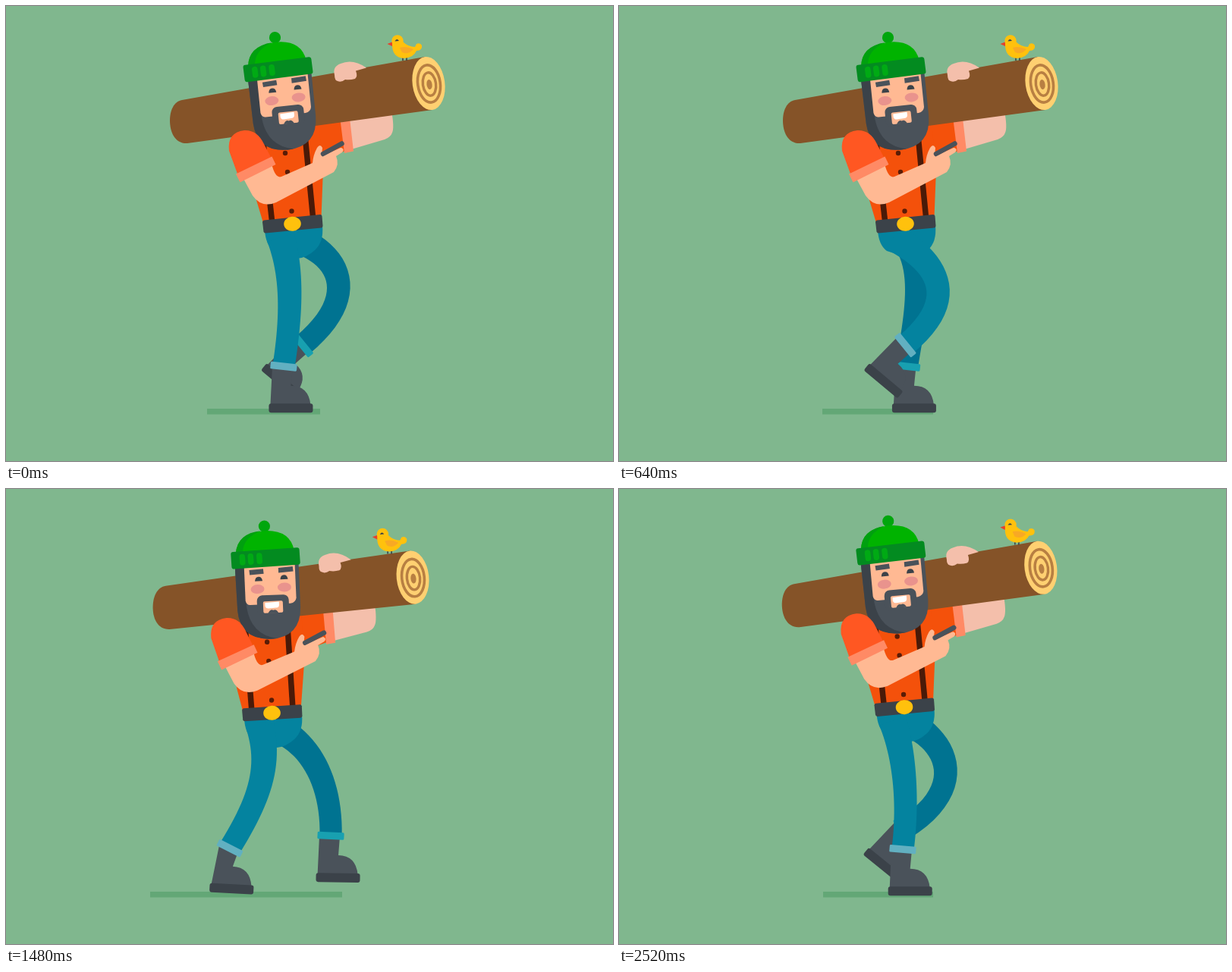
Write an HTML page with a canvas that moves like this. It is 800 px wide and 600 px high and loops after 2.56 s.

```html
<!DOCTYPE html>
<html lang="en">
<head>
<meta charset="utf-8">
<title>Lumberjack walk</title>
<style>
html, body { margin: 0; width: 100%; height: 100%; overflow: hidden; background: #80b78e; }
canvas { display: block; }
</style>
</head>
<body>
<canvas id="stage" width="800" height="600"></canvas>
<script>
const ctx = document.getElementById('stage').getContext('2d');
const LOOP = 2560, CYCLE = 1280, STEP = 640, TICK = 40;
const RAD = Math.PI / 180;
const SKIN = '#ffb993', PALE = '#f4bfab', DARK = '#4a525a', DEEP = '#3b4249';
// bow shifts the upper curve handle of a leg
const NEAR = { trouser: '#04839f', cuff: '#62b0c1', bow: [0, 0] };
const FAR = { trouser: '#007391', cuff: '#18a0b0', bow: [14, -9] };

// time, two curve handles, ankle (all relative to the hip), cuff angle, foot angle
const LEG = [
  [0, 16, 50, 14, 105, 4, 170, 6, 0],
  [200, 13, 52, 1, 94, -40, 160.5, 27, 3],
  [330, 20, 50, 11, 97, -52, 150, 40, 20],
  [440, 31, 47, 33, 99, -29, 150, 46, 45],
  [600, 40, 29, 93, 85, 2, 142.5, 50, 39],
  [640, 51, 29, 94, 77, 15.5, 142, 51, 40],
  [840, 37, 26, 81, 72, 79.5, 144, 3, 1],
  [960, 42, 39, 75, 84, 85, 156.5, 0, 0],
  [1080, 36, 54, 59, 95, 55, 160, 3, 0],
  [1240, 15.5, 44.5, 21.5, 106.5, 13.5, 169.5, 5, 0]
];
// time, left end, right end
const SHADOW = [
  [0, 265, 414], [200, 190, 443], [350, 135, 441], [440, 149, 436],
  [640, 268, 414], [840, 204, 435], [990, 178, 440], [1240, 269, 414]
];

// Smooth periodic curve through the keys
function spline(keys, time) {
  const t = ((time % CYCLE) + CYCLE) % CYCLE, n = keys.length;
  let i = n - 1;
  while (keys[i][0] > t) i--;
  const key = k => keys[(k + n) % n];
  const at = k => key(k)[0] + CYCLE * Math.floor(k / n);
  const span = at(i + 1) - at(i), u = (t - at(i)) / span;
  return key(i).slice(1).map((a, c) => {
    const b = key(i + 1)[c + 1];
    const m0 = (b - key(i - 1)[c + 1]) / (at(i + 1) - at(i - 1)) * span;
    const m1 = (key(i + 2)[c + 1] - a) / (at(i + 2) - at(i)) * span;
    return a + u * (m0 + u * (3 * (b - a) - 2 * m0 - m1 + u * (2 * (a - b) + m0 + m1)));
  });
}

function shape(d, color) {
  ctx.fillStyle = color;
  ctx.fill(new Path2D(d));
}

function line(d, color, width, cap = 'butt') {
  ctx.strokeStyle = color;
  ctx.lineWidth = width;
  ctx.lineCap = cap;
  ctx.stroke(new Path2D(d));
}

function oval(x, y, rx, ry, color, tilt = 0, ring = 0) {
  ctx.beginPath();
  ctx.ellipse(x, y, rx, ry, tilt * RAD, 0, 7);
  ctx.fillStyle = ctx.strokeStyle = color;
  ctx.lineWidth = ring;
  ring ? ctx.stroke() : ctx.fill();
}

function box(x, y, w, h, r, color) {
  ctx.beginPath();
  ctx.roundRect(x, y, w, h, r);
  ctx.fillStyle = color;
  ctx.fill();
}

function turned(x, y, deg, draw) {
  ctx.save();
  ctx.translate(x, y);
  ctx.rotate(deg * RAD);
  draw();
  ctx.restore();
}

function pivot(x, y, deg, draw) {
  turned(x, y, deg, () => { ctx.translate(-x, -y); draw(); });
}

function place(o, deg, x, y) {
  const c = Math.cos(deg * RAD), s = Math.sin(deg * RAD);
  return [o[0] + x * c - y * s, o[1] + x * s + y * c];
}

function leg(hx, hy, time, { trouser, cuff, bow }) {
  const [kx, ky, x2, y2, ax, ay, cuffTilt, footTilt] = spline(LEG, time);
  const x1 = kx + bow[0], y1 = ky + bow[1];
  const ankle = [hx + ax, hy + ay];
  const joint = place(ankle, cuffTilt, -2, 15);
  const foot = (x, y) => place(joint, footTilt, x + 2, y - 15);

  const boot = [place(ankle, cuffTilt, -15, 0), foot(-16, 51), foot(37, 51),
    foot(34, 26), foot(11, 26), place(ankle, cuffTilt, 12, 0)];
  shape(`M${boot[0]}L${boot[1]}L${boot[2]}Q${boot[3]} ${boot[4]}L${boot[5]}Z`, DARK);
  turned(...joint, footTilt, () => box(-16, 34.5, 58, 12, 3, DEEP));

  const left = [], right = [];
  for (let i = 0; i <= 24; i++) {
    const s = i / 24, r = 1 - s;
    const x = 3 * r * r * s * x1 + 3 * r * s * s * x2 + s * s * s * ax;
    const y = 3 * r * r * s * y1 + 3 * r * s * s * y2 + s * s * s * ay;
    const dx = r * r * x1 + 2 * r * s * (x2 - x1) + s * s * (ax - x2);
    const dy = r * r * y1 + 2 * r * s * (y2 - y1) + s * s * (ay - y2);
    const k = (14.6 + 4 * r * r) / Math.hypot(dx, dy);
    left.push([hx + x - dy * k, hy + y + dx * k]);
    right.unshift([hx + x + dy * k, hy + y - dx * k]);
  }
  shape('M' + [...left, ...right].join('L') + 'Z', trouser);
  turned(...ankle, cuffTilt, () => box(-17.5, -4.5, 35, 9.5, 1.5, cuff));
}

function bird() {
  line('M523 66V72M528 66V72', DEEP, 1.6);
  shape('M510 47L502.5 50L510 53.5Z', '#e5412d');
  shape('M509 49Q508 68 525 69Q537 68 541 59Q549 59 548 52Q546 48 541 50L539 54Q530 54 523 47Z', '#ffc10d');
  oval(516, 46, 7.7, 7.7, '#ffc10d');
  shape('M519 55Q527 52 537 57Q530 65 522 61Z', '#f8a924');
  shape('M512.5 46.5Q515 42 518 46Z', DEEP);
}

function log() {
  shape('M232 124L552 67L562 137L239 181C223 182 216 167 216 151C216 138 221 126 232 124Z', '#855328');
  oval(557, 102, 21.3, 35.3, '#ffd071', -8);
  oval(557.5, 102.5, 14.8, 24.8, '#b87f42', -8, 3.6);
  oval(558, 103, 8.6, 15.3, '#b87f42', -8, 3.4);
  oval(558, 103.5, 3.6, 6.5, '#b87f42', -8);
}

function head(open) {
  shape('M304 100H388V158Q387 198 347 199Q307 197 305 160Z', DARK);
  shape('M304 100H317V155Q321 192 355 198.5Q307 202 305 160Z', DEEP);
  shape('M316 99H383V146Q382 152 375 153H322Q317 153 316 147Z', SKIN);
  oval(332.5, 132.5, 9, 6, '#e9938d');
  oval(368, 131.5, 9, 6, '#e9938d');
  shape('M322.5 107L341 106L341.5 112.5L323 113.5ZM361 105.5L380 104.5L380.5 111L361 112Z', DARK);
  for (const [x, y] of [[334.5, 122], [368, 121]]) {
    const top = y - 2 * (1 - open), h = 1.8 + 4 * open;
    shape(`M${x - 5} ${top}Q${x - 4.5} ${top - h} ${x} ${top - h}T${x + 5} ${top}Z`, DEEP);
  }
  box(331, 141, 42, 27, 7, DARK);
  box(339, 149, 26, 15.5, 2, SKIN);
  shape('M345 165Q348 159 352 161Q356 159 359 165Z', DARK);
  shape('M341.5 151L360 150V154Q360 158 356 158L346 158.5Q342 158.5 341.5 155Z', '#fff');

  oval(345, 50, 7.6, 7.6, '#00a60d');
  shape('M306 84Q309 57 345 56Q379 56 383 84Z', '#00b300');
  shape('M306 84Q309 58 340 56Q316 64 315 84Z', '#00a00f');
  pivot(345, 92, -1.4, () => {
    box(299.5, 81, 90.5, 22.5, 3, '#038b20');
    for (const x of [310.5, 321.5, 333]) box(x, 84.5, 7.5, 15, 3.7, '#00aa14');
  });
}

function nearArm() {
  shape('M312 226L350 208Q355 228 363 225L404 207Q405 196 410 187Q414 181 417 187L416 198L441 187Q447 188 443 193L435 198Q440 209 432 219L356 259Q337 267 325 250Z', SKIN);
  line('M418 195L442.5 181.5', DARK, 6.5, 'round');
  line('M420 200.5L441.5 190', SKIN, 5.5, 'round');
  shape('M294 191Q291 167 314 164Q331 163 340 182L351 203L306 224Z', '#ff5722');
  shape('M303 221.5L350.5 198.5L355.5 209L308.5 232.5Z', '#ff8a65');
}

function shirt() {
  shape('M314 165L412 155L418 215L415.5 279L339 286L330 256Z', '#f4510b');
  line('M339 180L350.5 283', '#4a1a08', 7.5);
  line('M394.5 175L404.5 278', '#4a1a08', 7.5);
  for (const [x, y] of [[368, 194], [371, 219], [376.5, 270.5]]) oval(x, y, 3.2, 3.2, '#5a1c06');
}

function render(time) {
  const t = Math.floor(time % LOOP / TICK) * TICK;
  const turn = 2 * Math.PI * t / STEP;
  const dip = 1 - Math.cos(turn), lag = Math.sin(turn);
  const bx = -19.5 * dip, by = 5.8 * dip;
  const bounce = 1.8 * dip - 2.16 * lag;

  ctx.fillStyle = '#80b78e';
  ctx.fillRect(0, 0, 800, 600);
  const [from, to] = spline(SHADOW, t);
  ctx.fillStyle = '#63a776';
  ctx.fillRect(from, 531, to - from, 7.5);

  leg(375.5 + bx, 305 + by, t + STEP, FAR);
  ctx.save();
  ctx.translate(bx, by);
  shape('M341 295L417 290Q419 311 407 322Q396 332 384 333L353 323Q342 315 341 295Z', NEAR.trouser);
  ctx.restore();
  leg(362 + bx, 305 + by, t, NEAR);

  ctx.save();
  ctx.translate(bx, by);
  pivot(377, 287, 1.37 * dip, () => {
    ctx.save();
    ctx.translate(0, bounce);
    shape('M448 148L508 138Q512 160 509 167Q507 173 499 176L455 189Z', PALE);
    shape('M405 155L443 150L447 191L414 204Z', '#f4510b');
    shape('M440.5 150L453 148L458 191.5L446 194Z', '#ff8a65');
    ctx.restore();
    shirt();
    ctx.save();
    ctx.translate(0, bounce);
    log();
    pivot(526, 70, 3.1 * dip - 6.2 * lag, bird);
    shape('M433 91Q430 80 441 76Q457 69 475 81.5L461 85.5Q464 93 460 96Q453 98 447 97Q442 101 437 99Q433 98 433 91Z', PALE);
    ctx.restore();
    shape('M340 282.5L414 275Q416 275 416.5 277L417.5 290Q417.5 292 415.5 292.5L342 299.5Q340 299.5 339.5 297.5L338 285Q338 283 340 282.5Z', DEEP);
    oval(377.5, 287.3, 11.3, 9.5, '#ffc10d', -5);

    ctx.save();
    ctx.translate(0.9 * dip, 0.4 * bounce);
    pivot(368, 185, 1.63 * dip - 0.92 * lag, () => turned(368.2, 122.2, -5.8, () => {
      ctx.translate(-350.5, -131.5);
      head(Math.min(1, Math.abs(t - 1720) / 120));
    }));
    ctx.restore();
    pivot(315, 185, -lag, nearArm);
  });
  ctx.restore();
}

function loop() {
  render(performance.now());
  requestAnimationFrame(loop);
}
loop();
</script>
</body>
</html>
```
